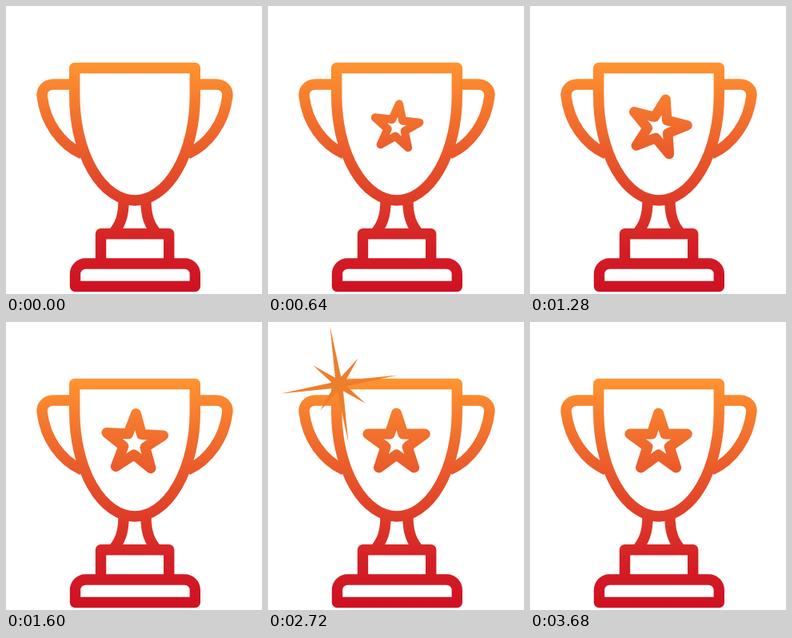
Recreate the animation shown at these times as an HTML page. Size 320x360 px, loop 5840 ms.

```html
<!DOCTYPE html>
<html lang="en">
<head>
<meta charset="utf-8">
<title>Trophy</title>
<style>
  html, body { margin: 0; width: 100%; height: 100%; overflow: hidden; background: #fff; }
  svg { display: block; width: 100%; height: 100%; }
</style>
</head>
<body>
<svg viewBox="0 0 320 360">
  <defs>
    <linearGradient id="heat" gradientUnits="userSpaceOnUse" x1="0" y1="71" x2="0" y2="357">
      <stop offset="0" stop-color="#ff9430"/>
      <stop offset=".8" stop-color="#d41f26"/>
      <stop offset="1" stop-color="#cf1122"/>
    </linearGradient>
  </defs>
  <g fill="none" stroke="url(#heat)" stroke-width="13.4" stroke-linejoin="round">
    <path d="M85.7 77.5H236.3V112A75.3 131 0 0 1 85.7 112Z"/>
    <path d="M86 98H59C50 98 44 105 45.2 113C49 146 69 173 95 185"/>
    <path d="M236 98H263C272 98 278 105 276.8 113C273 146 253 173 227 185"/>
    <path d="M147 244C147 262 143 274 133 285M175 244C175 262 179 274 189 285"/>
    <path d="M118.5 322V284.7H203.7V322"/>
    <path d="M86.5 350.5V335a13 13 0 0 1 13-13H223.3a13 13 0 0 1 13 13V350.5Z"/>
    <path id="star"/>
  </g>
  <path id="sparkle" fill="#ed7e2d"/>
</svg>
<script>
  const LOOP = 5840, STEP = 80;
  const star = document.getElementById('star');
  const sparkle = document.getElementById('sparkle');

  // Closed polygon whose points cycle through the given radii.
  function burst(cx, cy, radii, count, degrees) {
    const points = Array.from({ length: count }, (_, i) => {
      const angle = (degrees + i * 360 / count) * Math.PI / 180;
      const r = radii[i % radii.length];
      return (cx + r * Math.sin(angle)).toFixed(2) + ' ' + (cy - r * Math.cos(angle)).toFixed(2);
    });
    return 'M' + points.join('L') + 'Z';
  }

  // Equivalent to cubic-bezier(0, 0, 0, 1).
  function easeOut(p) {
    const u = Math.cbrt(Math.min(1, p));
    return u * u * (3 - 2 * u);
  }

  function drawStar(t) {
    const grow = easeOut(t / 1880);
    const r = 37.5 * grow;
    star.setAttribute('stroke-width', 13 * grow);
    star.setAttribute('d', grow ? burst(160.6, 151.6, [r, r * 0.382], 10, 360 * (1 - grow)) : '');
  }

  function drawSparkle(t) {
    const r = 81 - 0.093 * Math.abs(t - 2800);
    const turn = -15 - 0.175 * (t - 2240);
    const radii = [r, r * 0.13, r * 0.55, r * 0.13];
    sparkle.setAttribute('d', r > 0 ? burst(89, 78, radii, 16, turn) : '');
  }

  const start = performance.now();
  function frame() {
    const elapsed = (performance.now() - start) % LOOP;
    const t = Math.floor(elapsed / STEP) * STEP;
    drawStar(t);
    drawSparkle(t);
    requestAnimationFrame(frame);
  }
  frame();
</script>
</body>
</html>
```
